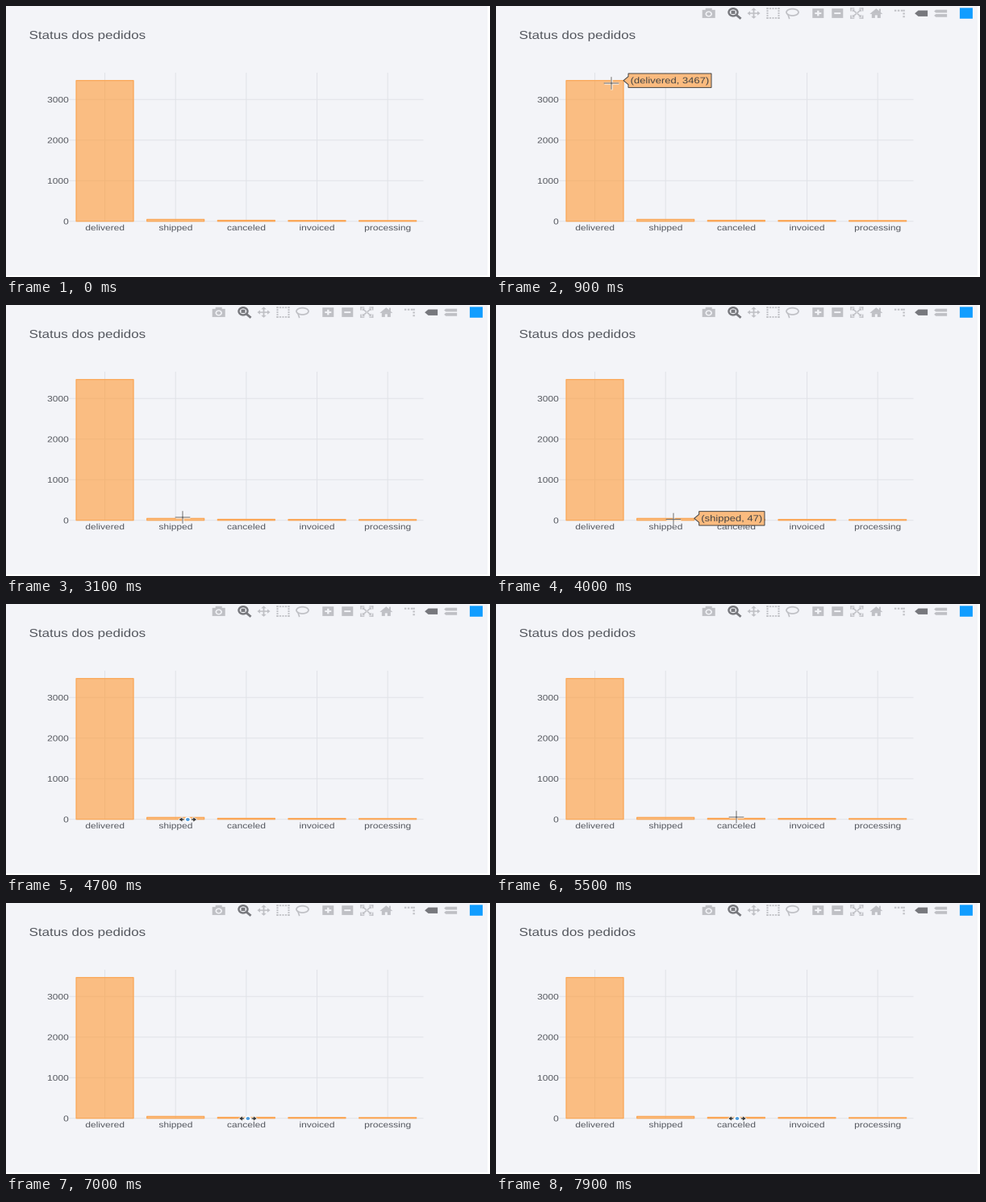
Recreate the animation shown at these times as a matplotlib script. Size 600 by 337 pixels, loop 8000 ms.

```python
import numpy as np
import matplotlib.pyplot as plt
from matplotlib.animation import FuncAnimation
from matplotlib.patches import Ellipse, PathPatch, Polygon, Rectangle
from matplotlib.path import Path
from matplotlib.textpath import TextPath
from matplotlib.transforms import Affine2D

W, H, DPI = 600, 337, 100
STEP, COUNT = 100, 80
V = 0.838            # the page is shown slightly flattened
PX = 72 / DPI        # one pixel in points

BG, GRID, INK = "#F3F4F8", "#E1E3E8", "#55585F"
ORANGE, PEACH, DARK = "#FBA654", "#FBBB7F", "#444444"
PALE, ACTIVE, BLUE = "#BFC0C5", "#77787D", "#119DFF"

LEFT, RIGHT, TOP, BASE = 78.7, 517, 99.6, 319.5
NAMES = ["delivered", "shipped", "canceled", "invoiced", "processing"]
VALUES = [3467, 47, 25, 21, 18]
SLOT = (RIGHT - LEFT) / len(NAMES)
HALF = SLOT * 0.405
UNIT = (BASE - TOP) * 0.95 / VALUES[0]

fig = plt.figure(figsize=(W / DPI, H / DPI), dpi=DPI, facecolor="white")
ax = fig.add_axes([0, 0, 1, 1])
ax.set_xlim(0, W)
ax.set_ylim(H / V, 0)
ax.axis("off")


def center(i):
    return LEFT + SLOT * (i + 0.5)


def height(value):
    return BASE - value * UNIT


def text(x, y, s, size, color=INK, align=0.0, z=5):
    """Place s with its baseline at y; align 0 left, 0.5 centre, 1 right."""
    path = TextPath((0, 0), s, size=size, prop={"family": "Liberation Sans"})
    box = path.get_extents()
    move = Affine2D().scale(1, -1).translate(x - box.x0 - align * box.width, y)
    patch = PathPatch(path.transformed(move), fc=color, lw=0, zorder=z)
    ax.add_patch(patch)
    return patch, box.width


def line(xs, ys, color, lw=1.0, z=1):
    return ax.plot(xs, ys, color=color, lw=lw * PX, zorder=z, snap=False)


# chart
ax.add_patch(Rectangle((0, 0), 597, 400, fc=BG, lw=0, zorder=0))
text(29.3, 48.8, "Status dos pedidos", 17)

for value in range(0, 4000, 1000):
    y = height(value)
    line([LEFT, RIGHT], [y, y], GRID)
    text(77.3, y + 4.4, str(value), 12, align=1)

for i, (name, value) in enumerate(zip(NAMES, VALUES)):
    x, y = center(i), height(value)
    line([x, x], [TOP, BASE], GRID)
    box = (x - HALF, y), 2 * HALF, BASE - y
    ax.add_patch(Rectangle(*box, fc=(1, 0.6, 0.2, 0.6), lw=0, zorder=2, snap=False))
    ax.add_patch(Rectangle(*box, fill=False, ec=ORANGE, lw=1.2 * PX,
                           joinstyle="round", zorder=3, snap=False))
    text(x, BASE + 13.5, name, 12, align=0.5)


# toolbar: icons are drawn around their own centre
toolbar = []
BAR_Y = 10.8
SIGNS = (-1, 1)


def shape(cx, pts, color=PALE):
    pts = np.array(pts) + (cx, BAR_Y)
    toolbar.append(ax.add_patch(Polygon(pts, fc=color, lw=0, zorder=6, snap=False)))


def rect(cx, x, y, w, h, color=PALE):
    """Rectangle given by its middle and size."""
    corner = (cx + x - w / 2, BAR_Y + y - h / 2)
    toolbar.append(ax.add_patch(Rectangle(corner, w, h, fc=color, lw=0, zorder=6,
                                          snap=False)))


def stroke(cx, x0, y0, x1, y1, lw=1.6, color=PALE):
    toolbar.extend(line([cx + x0, cx + x1], [BAR_Y + y0, BAR_Y + y1], color, lw, 6))


def oval(cx, x, y, w, h, fc="none", ec="none", lw=0.0):
    toolbar.append(ax.add_patch(Ellipse((cx + x, BAR_Y + y), w, h, fc=fc, ec=ec,
                                        lw=lw * PX, zorder=6)))


def tag(cx, y, half, color=PALE):
    nose = half - 8
    shape(cx, [(-8, y), (nose, y - half), (8, y - half), (8, y + half),
               (nose, y + half)], color)


def camera(cx):
    rect(cx, 0, 1, 16, 12)
    rect(cx, 0, -6, 8, 3)
    oval(cx, 0, 1, 8.4, 8.4, fc=BG)
    oval(cx, 0, 1, 5, 5, fc=PALE)


def magnifier(cx):
    oval(cx, -1.5, -1.5, 11, 11, ec=ACTIVE, lw=2.4)
    rect(cx, -1.5, -1.5, 5, 5, ACTIVE)
    stroke(cx, 2.8, 2.8, 7, 7, 2.8, ACTIVE)


def pan(cx):
    rect(cx, 0, 0, 12, 1.8)
    rect(cx, 0, 0, 1.8, 12)
    for s in SIGNS:
        head = np.array([(8, 0), (4.5, -3.2), (4.5, 3.2)]) * s
        shape(cx, head)
        shape(cx, head[:, ::-1])


def box_select(cx):
    for k in np.linspace(-7, 7, 5):
        for s in SIGNS:
            rect(cx, k, 7 * s, 2.2, 2)
            rect(cx, 7 * s, k, 2, 2.2)


def lasso(cx):
    oval(cx, 0, -1.5, 15, 10, ec=PALE, lw=1.7)
    stroke(cx, -5.5, 2, -4, 7.5)


def zoom_out(cx):
    rect(cx, 0, 0, 14, 14)
    rect(cx, 0, 0, 8, 2.4, BG)


def zoom_in(cx):
    zoom_out(cx)
    rect(cx, 0, 0, 2.4, 8, BG)


def autoscale(cx):
    for sx in SIGNS:
        for sy in SIGNS:
            rect(cx, 7.3 * sx, 5.5 * sy, 1.5, 5)
            rect(cx, 5.5 * sx, 7.3 * sy, 5, 1.5)
            stroke(cx, sx, sy, 4.5 * sx, 4.5 * sy, 1.5)
            shape(cx, np.array([(5.5, 5.5), (2, 5.5), (5.5, 2)]) * (sx, sy))


def home(cx):
    shape(cx, [(-8, 1), (0, -7), (8, 1)])
    rect(cx, 4.6, -4, 2, 5)
    rect(cx, 0, 4, 11, 6)
    rect(cx, 0, 5, 3, 4.5, BG)


def spikes(cx):
    for k in range(3):
        rect(cx, 4 * k - 8, -4, 2.4, 2.4)
        rect(cx, 2.5, 4.5 * k - 4, 2.4, 2.4)


def closest(cx):
    tag(cx, 0.2, 4.4, ACTIVE)


def compare(cx):
    for s in SIGNS:
        tag(cx, 0.2 + 3.2 * s, 2.2)


def badge(cx):
    rect(cx, 0, 0, 16, 16, BLUE)


GROUPS = [[camera], [magnifier, pan, box_select, lasso],
          [zoom_in, zoom_out, autoscale, home], [spikes, closest, compare], [badge]]
x = 263.7
for group in GROUPS:
    for icon in group:
        icon(x)
        x += 24
    x += 7.8


# hover labels
def hover_label(i):
    tip, y = center(i) + HALF, height(VALUES[i])
    label, width = text(tip + 9.4, y + 4.2, f"({NAMES[i]}, {VALUES[i]})", 13,
                        color=DARK, z=9)
    x0, x1, half = tip + 6, tip + 13 + width, 10.4
    outline = [(tip, y), (x0, y - 6), (x0, y - half), (x1, y - half),
               (x1, y + half), (x0, y + half), (x0, y + 6)]
    frame = ax.add_patch(Polygon(outline, fc=PEACH, ec=DARK, lw=PX, zorder=8))
    return [frame, label]


labels = [hover_label(i) for i in range(len(NAMES))]


# pointers
def part(path, **kw):
    return ax.add_patch(PathPatch(path, **kw))


def disc(r, color, z):
    return part(Path.unit_circle().transformed(Affine2D().scale(r)), fc=color,
                lw=0, zorder=z)


def arrow(s):
    pts = np.array([(11.5, 0), (6.5, -4), (6.5, -1.2), (4.2, -1.2), (4.2, 1.2),
                    (6.5, 1.2), (6.5, 4), (11.5, 0)]) * (s, 1)
    return part(Path(pts, closed=True), fc="#3A3A3A", ec="white",
                lw=0.7 * PX, zorder=11)


ARM = 9.3
plus = Path([(-ARM, 0), (ARM, 0), (0, -ARM), (0, ARM)],
            [Path.MOVETO, Path.LINETO] * 2)
cross = [part(plus, fill=False, ec=(1, 1, 1, 0.6), lw=3 * PX, zorder=10),
         part(plus, fill=False, ec="#777777", lw=1.1 * PX, zorder=11, snap=False)]
resize = [disc(4, "white", 10), disc(2.3, "#4A9BDD", 11), arrow(-1), arrow(1)]

# eased pointer moves: start, end, then where it arrives
ENTER = 700
ORIGIN = np.array([150.0, 86.0])
MOVES = [(700, 900, 143, 96), (900, 1600, 138, 119), (2000, 2300, 142, 119),
         (2400, 3100, 219, 264), (3100, 3200, 220, 266.5), (4500, 4600, 222, 268),
         (4600, 5400, 300, 268), (5400, 5500, 298, 265), (6000, 6100, 301, 267.3),
         (6500, 6600, 300, 268), (6800, 7900, 299, 268)]


def ease(t, start, end):
    u = np.clip((t - start) / (end - start), 0, 1)
    return u * u * (3 - 2 * u)


def pointer(t):
    pos = ORIGIN
    for start, end, *goal in MOVES:
        pos = pos + (goal - pos) * ease(t, start, end)
    return pos[0], pos[1] / V


def draw(n):
    t = n * STEP
    for artist in toolbar:
        artist.set_alpha(np.clip((t - 400) / 300, 0, 1))

    x, y = pointer(t)
    inside, on_axis = t >= ENTER, y > BASE
    place = Affine2D().translate(x, y) + ax.transData
    for group, shown in ((cross, not on_axis), (resize, on_axis)):
        for artist in group:
            artist.set_visible(inside and shown)
            artist.set_transform(place)

    for i, label in enumerate(labels):
        over = abs(x - center(i)) < HALF and height(VALUES[i]) < y <= BASE
        for artist in label:
            artist.set_visible(inside and over)
    return []


anim = FuncAnimation(fig, draw, frames=COUNT, interval=STEP, repeat=True,
                     repeat_delay=0, blit=False)
plt.show()
```
